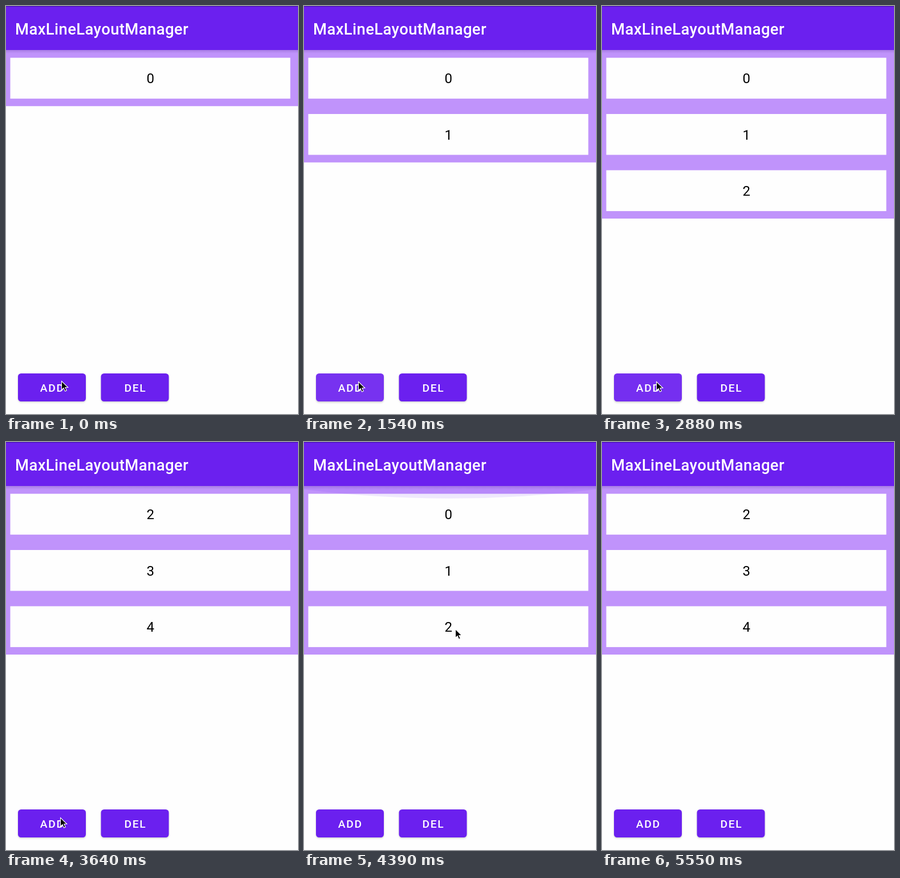
Animation, 512 px wide and 714 px high, one loop 6090 ms. Source, as an HTML page:

```html
<!DOCTYPE html>
<html lang="en">
<head>
<meta charset="utf-8">
<title>MaxLineLayoutManager</title>
<style>
  html, body { margin: 0; width: 100%; height: 100%; overflow: hidden; background: #fefefe; }
  svg { display: block; width: 100%; height: 100%; }
  text { font-family: Roboto, sans-serif; }
  .title { font-size: 27.4px; font-weight: 500; letter-spacing: .0153em; fill: #fff; }
  .label { font-size: 19.2px; font-weight: 500; letter-spacing: .0893em; fill: #fff; text-anchor: middle; }
  .digit { font-size: 24px; fill: #000; text-anchor: middle; }
  .button { width: 119px; height: 49px; rx: 5.5px; fill: #6b20ef; }
  .shade { fill: #000; opacity: .18; filter: url(#blur); }
</style>
</head>
<body>
<svg viewBox="0 0 512 714">
  <defs>
    <clipPath id="listClip"><rect id="listBox" y="77" width="512"/></clipPath>
    <clipPath id="addClip"><rect class="button" x="21" y="643"/></clipPath>
    <linearGradient id="fade" x2="0" y2="1">
      <stop stop-color="#301070" stop-opacity=".17"/>
      <stop offset="1" stop-color="#301070" stop-opacity="0"/>
    </linearGradient>
    <filter id="blur" x="-20%" y="-40%" width="140%" height="180%"><feGaussianBlur stdDeviation="1.5"/></filter>
  </defs>
  <rect width="512" height="714" fill="#fefefe"/>

  <g clip-path="url(#listClip)">
    <rect y="77" width="512" height="296" fill="#c093fb"/>
    <g id="rows"></g>
    <path id="topGlow" fill="#6b20ef"/>
    <path id="endGlow" fill="#6b20ef"/>
  </g>

  <rect y="77" width="512" height="6" fill="url(#fade)"/>
  <rect width="512" height="77" fill="#6b20ef"/>
  <rect width="512" height="1.2" fill="#4512b0"/>
  <text class="title" x="16" y="50">MaxLineLayoutManager</text>

  <rect id="addShade" class="button shade" x="21" y="644.5"/>
  <rect class="button shade" x="166.5" y="644.5"/>
  <rect class="button" x="21" y="643"/>
  <g clip-path="url(#addClip)"><circle id="ripple" fill="#fff"/></g>
  <rect class="button" x="166.5" y="643"/>
  <text class="label" x="81.3" y="675">ADD</text>
  <text class="label" x="227" y="675">DEL</text>

  <path id="cursor" d="M0 0V15.2L3.6 12L6 17.6L8.7 16.4L6.3 11H11.2Z" fill="#000" stroke="#fff" stroke-width="1.1"/>
</svg>
<script>
const LOOP = 6090, ROW = 98.4, TOP = 77, MAX_LINES = 3;
const LAST = 2;          // scroll offset of the final page, in rows
const GRAB_Y = 120, TURN = 4460;
const $ = id => document.getElementById(id);
const set = (el, attrs) => { for (const k in attrs) el.setAttribute(k, attrs[k]); };
const lerp = (a, b, p) => a + (b - a) * p;
const clamp = v => Math.min(1, Math.max(0, v));
const span = (t, from, length) => clamp((t - from) / length);
const easeOut = (p, power) => 1 - (1 - p) ** power;
const easeBoth = p => (1 - Math.cos(Math.PI * p)) / 2;

// press start, ripple length
const presses = [[1245, 345], [2060, 298], [2580, 340], [3230, 345]];
const added = [-LOOP, ...presses.map(([start]) => start + 60)];

// start, length, end x, end y
const moves = [
  [59, 1, 95.5, 657.5],
  [3850, 190, 256, GRAB_Y],
  [4040, 300, 265.5, 327.5],
  [TURN, 290, 266, 229.5],
  [5110, 260, 300, 735]
];

function pointerAt(t) {
  let x = 97.5, y = 656.5;
  for (const [start, length, endX, endY] of moves) {
    const p = easeBoth(span(t, start, length));
    x = lerp(x, endX, p);
    y = lerp(y, endY, p);
  }
  return { x, y };
}

function scrollAt(t, y) {
  if (t > TURN) return LAST * easeOut(span(t, TURN + 20, 440), 2);
  if (t > moves[2][0]) return Math.max(0, LAST - (y - GRAB_Y) / ROW);
  return presses.slice(MAX_LINES - 1)
    .reduce((sum, [start]) => sum + easeOut(span(t, start + 302, 70), 5), 0);
}

const rows = added.map((_, i) => {
  const g = document.createElementNS("http://www.w3.org/2000/svg", "g");
  g.innerHTML = `<rect x="7.5" y="13.6" width="491" height="71.5" fill="#fefefe"/>
    <text class="digit" x="253.2" y="58.4">${i}</text>`;
  $("rows").append(g);
  return g;
});

function drawList(t, offset) {
  const count = added.filter(a => t >= a).length;
  set($("listBox"), { height: Math.min(count, MAX_LINES) * ROW - .1 });
  rows.forEach((g, i) => set(g, {
    transform: `translate(0 ${TOP + (i - offset) * ROW})`,
    opacity: span(t, added[i] + 2, 120)
  }));
}

function drawGlow(el, pull, edge, dir) {
  const side = edge + dir * 6 * pull, mid = edge + dir * 38 * pull;
  set(el, { d: `M0 ${edge}V${side}Q256 ${mid} 512 ${side}V${edge}Z`, opacity: .1 * pull });
}

function drawRipple(t) {
  const press = presses.find(([start, length]) => t >= start && t < start + length);
  let alpha = 0;
  if (press) {
    const age = t - press[0], p = easeOut(span(age, 0, 225), 5);
    alpha = .25 * Math.min(1, .3 + age / 100) * clamp((press[1] - age) / 150);
    set($("ripple"), { cx: lerp(98, 86, p), cy: lerp(656, 667.5, p), r: lerp(34, 70, p) });
  }
  set($("ripple"), { opacity: alpha });
  set($("addShade"), { y: 644.5 + alpha * 6 });
}

function draw(t) {
  const { x, y } = pointerAt(t);
  const over = (y - GRAB_Y) / ROW - LAST;
  const topPull = t > moves[2][0] && t < 5000 ? clamp(over / .11) : 0;
  const endPull = span(t, 4850, 100) * (1 - span(t, 5100, 440));
  drawList(t, scrollAt(t, y));
  drawGlow($("topGlow"), topPull, TOP, 1);
  drawGlow($("endGlow"), endPull, TOP + MAX_LINES * ROW, -1);
  drawRipple(t);
  set($("cursor"), { transform: `translate(${x} ${y})` });
}

const begin = performance.now();
function tick() {
  draw((performance.now() - begin) % LOOP);
  requestAnimationFrame(tick);
}
draw(0);
requestAnimationFrame(tick);
</script>
</body>
</html>
```
